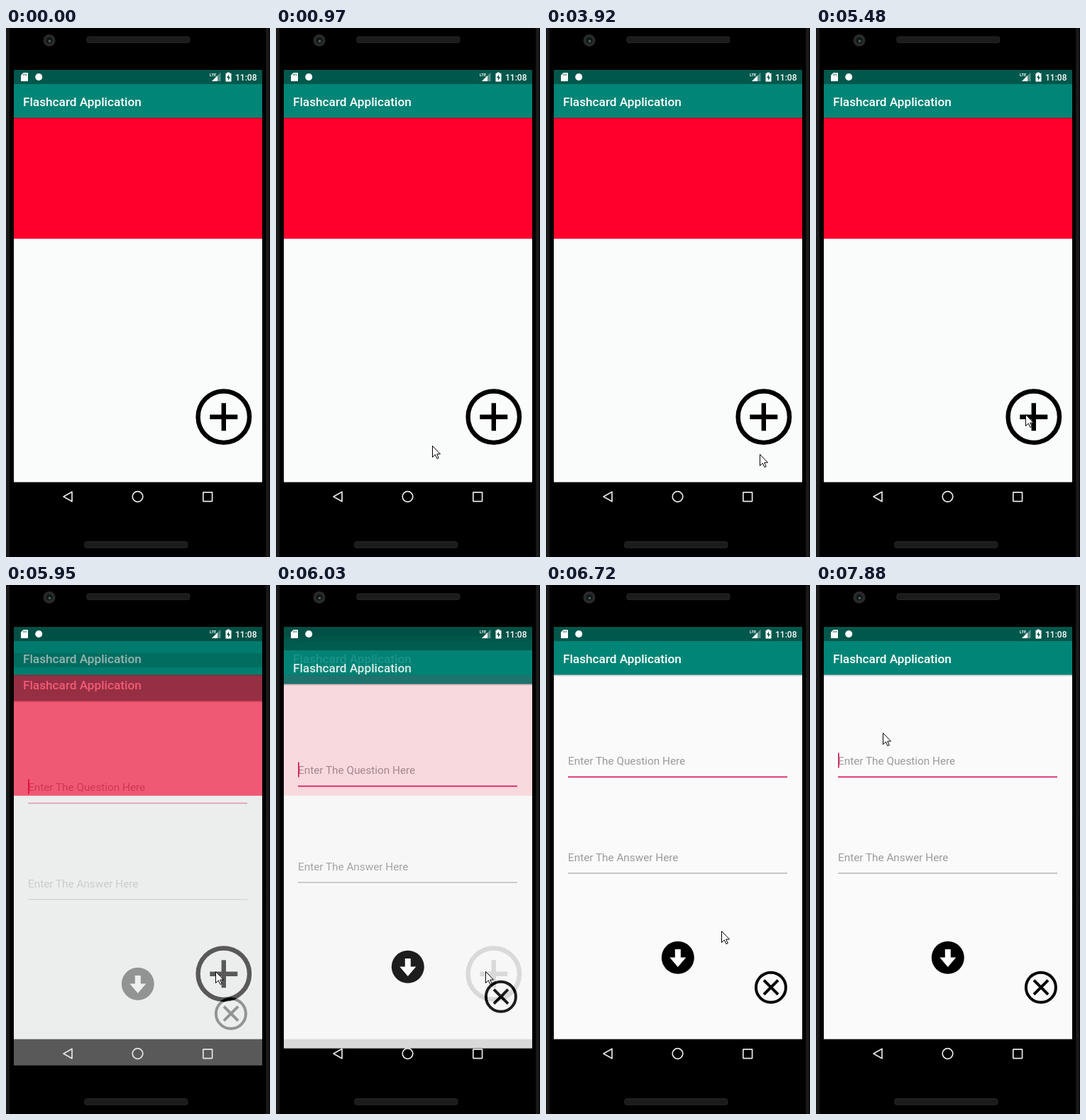
Recreate the animation shown at these times as an HTML page. Size 372 by 745 pixels, loop 8 s.

```html
<!DOCTYPE html>
<html lang="en">
<head>
<meta charset="utf-8">
<title>Flashcard app</title>
<style>
  html, body { margin: 0; width: 100%; height: 100%; overflow: hidden; background: #000; }
  svg { display: block; width: 372px; height: 745px; font-family: Roboto, sans-serif; }
  .title { font-size: 17.2px; font-weight: 500; fill: #fff; }
  .hint { font-size: 15.3px; fill: #000; fill-opacity: .385; }
</style>
</head>
<body>
<svg viewBox="0 0 372 745">
  <defs>
    <linearGradient id="edge">
      <stop offset="0" stop-color="#141414"/>
      <stop offset=".5" stop-color="#1e1e1e"/>
      <stop offset="1" stop-color="#050505"/>
    </linearGradient>
    <linearGradient id="shade" x2="0" y2="1">
      <stop offset="0" stop-opacity=".25"/>
      <stop offset="1" stop-opacity="0"/>
    </linearGradient>
    <g id="bars">
      <rect x="11" y="59" width="350" height="20" fill="#00574b"/>
      <rect x="11" y="79" width="350" height="47.500" fill="#008577"/>
      <rect x="11" y="126.500" width="350" height="2.500" fill="url(#shade)"/>
      <text class="title" x="24" y="109.500">Flashcard Application</text>
    </g>
    <rect id="speaker" width="145" height="8.500" rx="3" fill="#1b1b1b" stroke="#2b2b2b"/>
    <clipPath id="screen"><rect x="11" y="59" width="350" height="628"/></clipPath>
  </defs>

  <!-- phone body -->
  <rect width="372" height="745"/>
  <rect width="6" height="745" fill="url(#edge)"/>
  <rect x="366" width="6" height="745" fill="url(#edge)"/>
  <use href="#speaker" x="113.800" y="12.200"/>
  <use href="#speaker" x="110.800" y="723.500"/>
  <circle cx="61" cy="17.500" r="8.500" fill="#2a2a2a"/>
  <circle cx="61" cy="17.500" r="4.500" fill="#121818"/>
  <circle cx="61.500" cy="18.500" r="1.800" fill="#47665f"/>

  <g clip-path="url(#screen)">
    <!-- card page -->
    <g id="home">
      <rect x="11" y="126" width="350" height="513.600" fill="#f9fcfb"/>
      <rect x="11" y="126" width="350" height="170.800" fill="#ff002c"/>
      <use href="#bars"/>
      <g fill="none" stroke="#000" stroke-width="6.400">
        <circle cx="306.800" cy="547.700" r="36.200"/>
        <path d="M287.300 547.700h39M306.800 528.200v39"/>
      </g>
    </g>
    <!-- form page -->
    <g id="form">
      <rect x="11" y="126" width="350" height="514" fill="#fafafa"/>
      <rect x="11" y="639.600" width="350" height="48"/>
      <use href="#bars"/>
      <text class="hint" x="31" y="253">Enter The Question Here</text>
      <text class="hint" x="31" y="389">Enter The Answer Here</text>
      <rect x="31" y="269.500" width="309" height="1.700" fill="#d81b60"/>
      <rect x="31" y="405.200" width="309" height="1.400" fill-opacity=".29"/>
      <rect id="caret" x="31" y="236.500" width="1.700" height="21" fill="#d81b60"/>
      <circle cx="185.800" cy="524.800" r="23"/>
      <path d="M181.800 513h8v11.500h7.500L185.800 538l-11.500-13.500h7.500z" fill="#fff"/>
      <g fill="none" stroke="#000" stroke-width="4">
        <circle cx="316.900" cy="566.700" r="21"/>
        <path d="M307 556.700l20 20M327 556.700l-20 20"/>
      </g>
    </g>
  </g>

  <!-- system icons -->
  <g fill="#fff">
    <path d="M24.500 63h5.500q1 0 1 1v10q0 1-1 1h-8q-1 0-1-1v-7.500z"/>
    <path d="M24.500 64.500v2.500M26.500 64.500v2.500M28.500 64.500v2.500" stroke="#00574b" stroke-width=".8"/>
    <circle cx="46.200" cy="69" r="5"/>
    <text x="287" y="68" font-size="5.600" font-weight="700">LTE</text>
    <path d="M290 75h12.500V62.500z" opacity=".35"/>
    <path d="M290 75h8v-8z"/>
    <path d="M311.500 62.500h3.500v1.300h2.500V75.500h-8V63.800h2z"/>
    <path d="M314 65.500l-3 4.700h2v3.600l3-4.800h-2z" fill="#00574b"/>
    <text x="323" y="73.600" font-size="12" font-weight="500">11:08</text>
  </g>
  <g fill="none" stroke="#e6e6e6" stroke-width="1.700">
    <path d="M81 660l12-6.800v13.600z" stroke-linejoin="round"/>
    <circle cx="185.500" cy="660" r="7.300"/>
    <rect x="277.800" y="653.800" width="12.800" height="12.800" rx=".5"/>
  </g>

  <circle id="ring" cx="295" cy="544" r="14" fill="none" stroke="#333" stroke-width="1.500"/>
  <path id="mouse" d="M.5.5v16l3.800-3.600 2.600 5.600 2.300-1-2.500-5.500h4.800z" fill="#fff" stroke="#000"/>
</svg>
<script>
const LOOP = 8000, STEP = 75, OPEN = 5950;
const el = id => document.getElementById(id);
const set = (id, name, value) => el(id).setAttribute(name, value);
const show = (id, on) => set(id, "visibility", on ? "visible" : "hidden");

// Pointer strokes, each from the end of the last; without a bend they are straight.
const strokes = [
  { at: 510, steps: 7, to: [220, 588], bend: [270, 315] },
  { at: 1200, steps: 4, to: [266, 690] },
  { at: 1600, steps: 3, to: [304, 742] },
  { at: 1900, steps: 1, to: [304, 760] },
  { at: 3920, steps: 1, to: [301, 600] },
  { at: 4000, steps: 2, to: [296, 549] },
  { at: 4300, steps: 1, to: [295, 547] },
  { at: 4550, steps: 1, to: [295, 544] },
  { at: 6720, steps: 4, to: [143, 277], bend: [192, 436] },
  { at: 7350, steps: 8, to: [94, 208] }
];

const easeOut = (p, power) => 1 - (1 - Math.min(p, 1)) ** power;

function pointer(t) {
  let pos = [310, 790];
  for (const { at, steps, to, bend } of strokes) {
    if (t < at) break;
    const u = Math.min(Math.floor((t - at) / STEP) + 1, steps) / steps;
    pos = pos.map((a, i) => {
      const b = to[i], c = bend ? bend[i] : (a + b) / 2;
      return Math.round(a * (1 - u) ** 2 + 2 * c * u * (1 - u) + b * u * u);
    });
  }
  return pos;
}

function draw(t) {
  set("mouse", "transform", `translate(${pointer(t)})`);
  show("ring", t >= 5330 && t < 5480);

  const open = t >= OPEN;
  show("form", open);
  show("caret", open && Math.floor((t - 5920) / 490) % 2 === 0);
  set("home", "opacity", open ? .92 : 1);
  if (open) {
    const age = 22 + 62 * Math.floor((t - OPEN) / STEP);
    const dy = Math.round(51 * (1 - easeOut(age / 350, 5)));
    set("form", "transform", `translate(0 ${dy})`);
    set("form", "opacity", easeOut(age / 210, 4));
  }
}

const start = performance.now();
function tick() {
  draw((performance.now() - start) % LOOP);
  requestAnimationFrame(tick);
}
tick();
</script>
</body>
</html>
```
